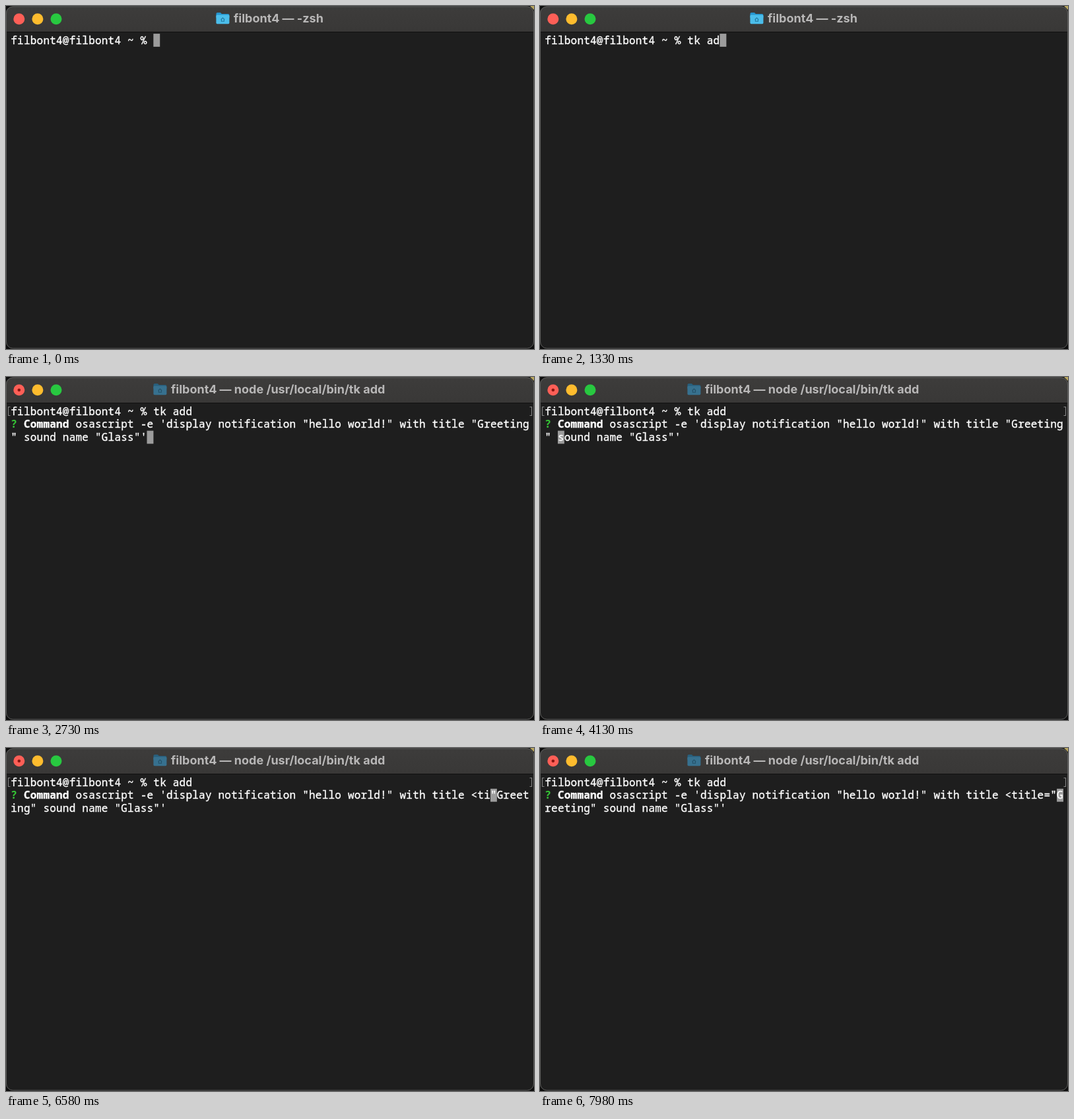
Animation of 800 by 521 pixels, one loop 8000 ms. Source, as an HTML page:

```html
<!DOCTYPE html>
<html lang="en">
<head>
<meta charset="utf-8">
<title>Terminal</title>
<style>
  html, body { margin: 0; width: 100%; height: 100%; overflow: hidden; background: #0c0c0c; }
  svg { display: block; width: 800px; height: 521px; }
  text { white-space: pre; }
  .mono { font: 500 16px "Noto Sans Mono", "DejaVu Sans Mono", monospace; letter-spacing: .22px; fill: #fff; stroke: #fff; stroke-width: .35px; }
  .mono .bold { font-weight: 700; }
  .mono .mark { font-weight: 700; fill: #35c435; stroke: none; }
  .title { font: 700 18px Inter, "Open Sans", sans-serif; fill: #b8b7b7; }
</style>
</head>
<body>
<svg viewBox="0 0 800 521">
  <defs>
    <clipPath id="window"><rect x="0" y="0.5" width="800" height="520" rx="10"/></clipPath>
    <linearGradient id="bar" x2="0" y2="1">
      <stop stop-color="#3d3c3b"/><stop offset="1" stop-color="#393837"/>
    </linearGradient>
  </defs>
  <path d="M794 0H800V6Z" fill="#b8a660"/>
  <g clip-path="url(#window)">
    <rect width="800" height="521" fill="#1e1e1e"/>
    <rect width="800" height="39" fill="url(#bar)"/>
    <rect y="39" width="800" height="1" fill="#101010"/>
  </g>
  <rect x="0.5" y="1" width="799" height="519" rx="10" fill="none" stroke="#5b5b5a"/>
  <circle cx="19.8" cy="19.7" r="8.5" fill="#fe5f57"/>
  <circle cx="47.9" cy="19.7" r="8.5" fill="#febc2e"/>
  <circle cx="76" cy="19.7" r="8.5" fill="#28c840"/>
  <circle id="busy" cx="19.8" cy="19.7" r="2.3" fill="#861510"/>

  <g id="folder">
    <path id="back" d="M0 3Q0 1 2 1H6.5L8.5 3H18Q20 3 20 5V9H0Z"/>
    <rect id="front" y="4.6" width="20" height="13.6" rx="1.6"/>
    <path id="house" d="M7.2 11.6L10 9L12.8 11.6M8 11.2V14.2H12V11.2" fill="none" stroke-width="1.1"/>
  </g>
  <text id="title" class="title" y="25.3"></text>

  <path id="brackets" d="M6.5 45.5H3.5V58.5H6.5M793.5 45.5H796.5V58.5H793.5" fill="none" stroke="#858585" stroke-width="1.1"/>
  <rect id="cursor" width="9.9" height="19.8" fill="#9c9c9c"/>
  <g class="mono">
    <text id="shell"></text>
    <g id="label">
      <text id="mark" class="mark">?</text>
      <text id="name" class="bold">Command</text>
    </g>
    <text id="first"></text>
    <text id="second"></text>
  </g>
</svg>
<script>
const LOOP = 8000, COLS = 80, CELL = 9.82, LEFT = 7.3, TOP = 42.1, LINE = 19.75;
const USER = 'filbont4';
const PROMPT = `${USER}@${USER} ~ % `;
const LABEL_COLS = 10;
const COMMAND = `osascript -e 'display notification "hello world!" with title "Greeting" sound name "Glass"'`;
const INSERT_AT = COMMAND.indexOf('"Greeting');

const SHELL = { text: 'tk add', times: [770, 910, 1050, 1190, 1330, 1540] };
const INSERT = { text: '<title=', times: [6020, 6300, 6440, 6650, 6790, 7000, 7490] };
const ENTER = 1750, RUNNING = 1820, ASK = 2100, PASTE = 2730, STEP_RIGHT = 7980;

// Cursor stops inside the pasted command
const STOPS = [
  [PASTE, COMMAND.length],
  [3360, COMMAND.indexOf('Glass')],
  [3570, COMMAND.indexOf('name "')],
  [3850, COMMAND.indexOf('sound')],
  [4200, INSERT_AT + 1],
  [5110, INSERT_AT]
];

const el = id => document.getElementById(id);
const show = (id, on) => el(id).setAttribute('visibility', on ? 'visible' : 'hidden');
const typed = ({ text, times }, t) => text.slice(0, times.filter(at => at <= t).length);

function place(id, col, row) {
  el(id).setAttribute('x', LEFT + col * CELL);
  el(id).setAttribute('y', TOP + row * LINE + 15.4);
}

function moveCursor(index) {
  const row = Math.floor(index / COLS);
  el('cursor').setAttribute('x', LEFT + (index % COLS) * CELL);
  el('cursor').setAttribute('y', TOP + row * LINE);
}

function drawTitle(running) {
  const x = running ? 223 : 318;
  const colors = running ? ['#285f7c', '#37718f', '#245168'] : ['#2595cf', '#4bbdea', '#23789f'];
  el('folder').setAttribute('transform', `translate(${x + 0.4} 9)`);
  el('back').setAttribute('fill', colors[0]);
  el('front').setAttribute('fill', colors[1]);
  el('house').setAttribute('stroke', colors[2]);
  el('title').setAttribute('x', x + 27);
  el('title').textContent = `${USER} — ${running ? 'node /usr/local/bin/tk add' : '-zsh'}`;
  show('busy', running);
}

function draw(t) {
  const shell = PROMPT + typed(SHELL, t);
  const inserted = typed(INSERT, t);
  const input = t < PASTE ? '' : COMMAND.slice(0, INSERT_AT) + inserted + COMMAND.slice(INSERT_AT);
  const split = COLS - LABEL_COLS;

  drawTitle(t >= RUNNING);
  show('brackets', t >= ENTER);
  show('label', t >= ASK);
  el('shell').textContent = shell;
  el('first').textContent = input.slice(0, split);
  el('second').textContent = input.slice(split);

  if (t < ENTER) moveCursor(shell.length);
  else if (t < ASK) moveCursor(COLS);
  else {
    const stop = STOPS.filter(([at]) => at <= t).pop();
    const offset = stop ? stop[1] + inserted.length + (t >= STEP_RIGHT ? 1 : 0) : 0;
    moveCursor(COLS + LABEL_COLS + offset);
  }
}

place('shell', 0, 0);
place('mark', 0, 1);
place('name', 2, 1);
place('first', LABEL_COLS, 1);
place('second', 0, 2);

const start = performance.now();
function tick() {
  draw((performance.now() - start) % LOOP);
  requestAnimationFrame(tick);
}
tick();
</script>
</body>
</html>
```
